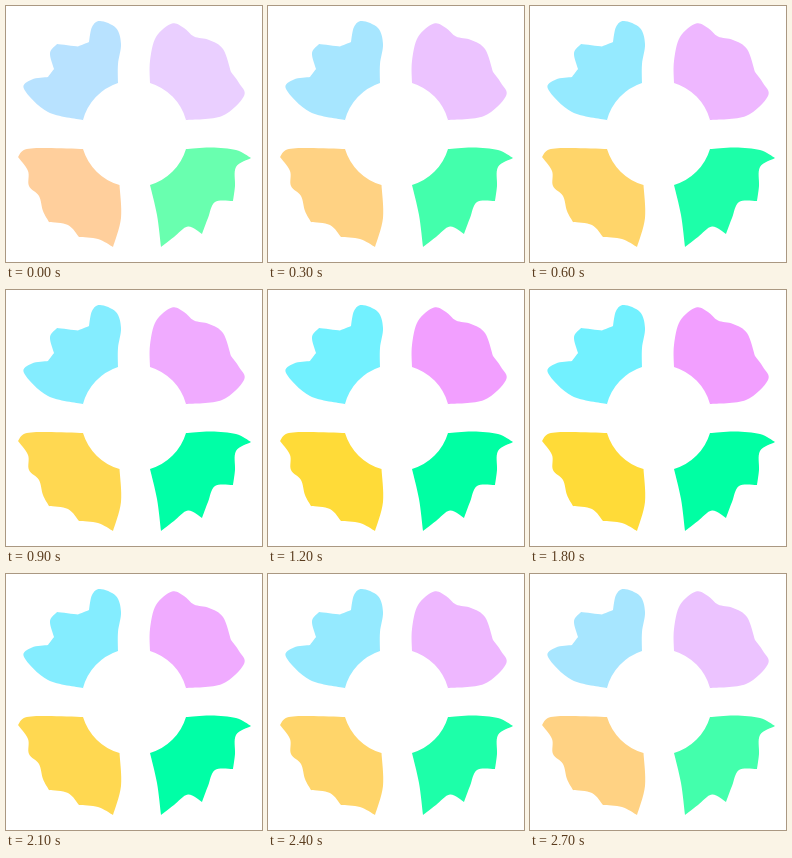
Recreate the animation shown at these times as an HTML page. Size 256x256 px, loop 3 s.

```html
<!DOCTYPE html>
<html lang="en">
<head>
<meta charset="utf-8">
<title>Four petals</title>
<style>
html, body { margin: 0; width: 100%; height: 100%; overflow: hidden; background: #fff; }
svg { display: block; width: 100%; height: 100%; }
</style>
</head>
<body>
<svg viewBox="0 0 256 256"></svg>
<script>
// edge: key points of the outer edge, '|' marks a sharp corner.
// base and delta: starting colour and its change per step.
const petals = [
  {
    edge: '77,114 42,106 18,83 26,73.5 42,71 | 48,63 | 44,47 51,38 | 72,40.5 | 83,36 | 86,21 94,15 110,22 115,38 112,58 112,77',
    base: [184, 226, 255], delta: [-17.5, 3.75, 0]
  },
  {
    edge: '180,114 216,110 238,90 233,77 225,66 | 217,43 203,34 188,30.5 178,22 166,17.5 150,31 144,55 144,77',
    base: [234, 207, 255], delta: [2, -12, 0]
  },
  {
    edge: '113.5,179 115,212 107,241 | 92,233 73,231 | 62,219 43,216 | 37,205 33,190 23,180 22,165 12,151 | 19,143.5 40,142 77,143',
    base: [255, 207, 156], delta: [0, 3, -25]
  },
  {
    edge: '180,143 205,141.5 230,144 245,152 | 230,161 229,180 227,195 | 209,196 202,212 196,228 | 182,220.5 168,231 155,241 | 151,209 144,179',
    base: [105, 255, 175], delta: [-38, 0, -3]
  }
];

// Catmull-Rom curve through the points of one run
function curve(points) {
  const at = i => points[Math.max(0, Math.min(points.length - 1, i))];
  return points.slice(1).map((end, i) => {
    const start = at(i);
    const out = start.map((v, k) => v + (end[k] - at(i - 1)[k]) / 6);
    const into = end.map((v, k) => v - (at(i + 2)[k] - start[k]) / 6);
    return `C${[...out, ...into, ...end]}`;
  }).join('');
}

function outline(edge) {
  const runs = edge.split('|').map(run => run.trim().split(' ').map(p => p.split(',').map(Number)));
  const first = runs[0][0];
  let last = first, path = `M${first}`;
  for (const run of runs) {
    path += curve([last, ...run]);
    last = run[run.length - 1];
  }
  return path;
}

const svg = document.querySelector('svg');
petals.forEach((petal, i) => {
  petal.shape = document.createElementNS(svg.namespaceURI, 'path');
  const sweep = i === 0 ? 1 : i === 1 ? 0 : 1;
  const first = petal.edge.split(' ')[0];
  // the inner edge follows the round hole back to the first point
  petal.shape.setAttribute('d', `${outline(petal.edge)}A53.5 53.5 0 0 ${inward(petal.edge)} ${first}Z`);
  svg.append(petal.shape);
});

// Arc direction that keeps the hole's centre at the middle of the stage
function inward(edge) {
  const points = edge.split(' ').filter(p => p !== '|').map(p => p.split(',').map(v => v - 128.5));
  const [ax, ay] = points[points.length - 1], [bx, by] = points[0];
  return ax * by > ay * bx ? 1 : 0;
}

function draw(now) {
  const step = Math.floor(now % 3000 / 300);
  const level = 5 - Math.abs(step - 5);
  for (const { shape, base, delta } of petals) {
    const rgb = base.map((c, k) => Math.max(0, Math.min(255, Math.round(c + delta[k] * level))));
    shape.setAttribute('fill', `rgb(${rgb})`);
  }
}

const start = performance.now();
function tick() {
  draw(performance.now() - start);
  requestAnimationFrame(tick);
}
tick();
</script>
</body>
</html>
```
